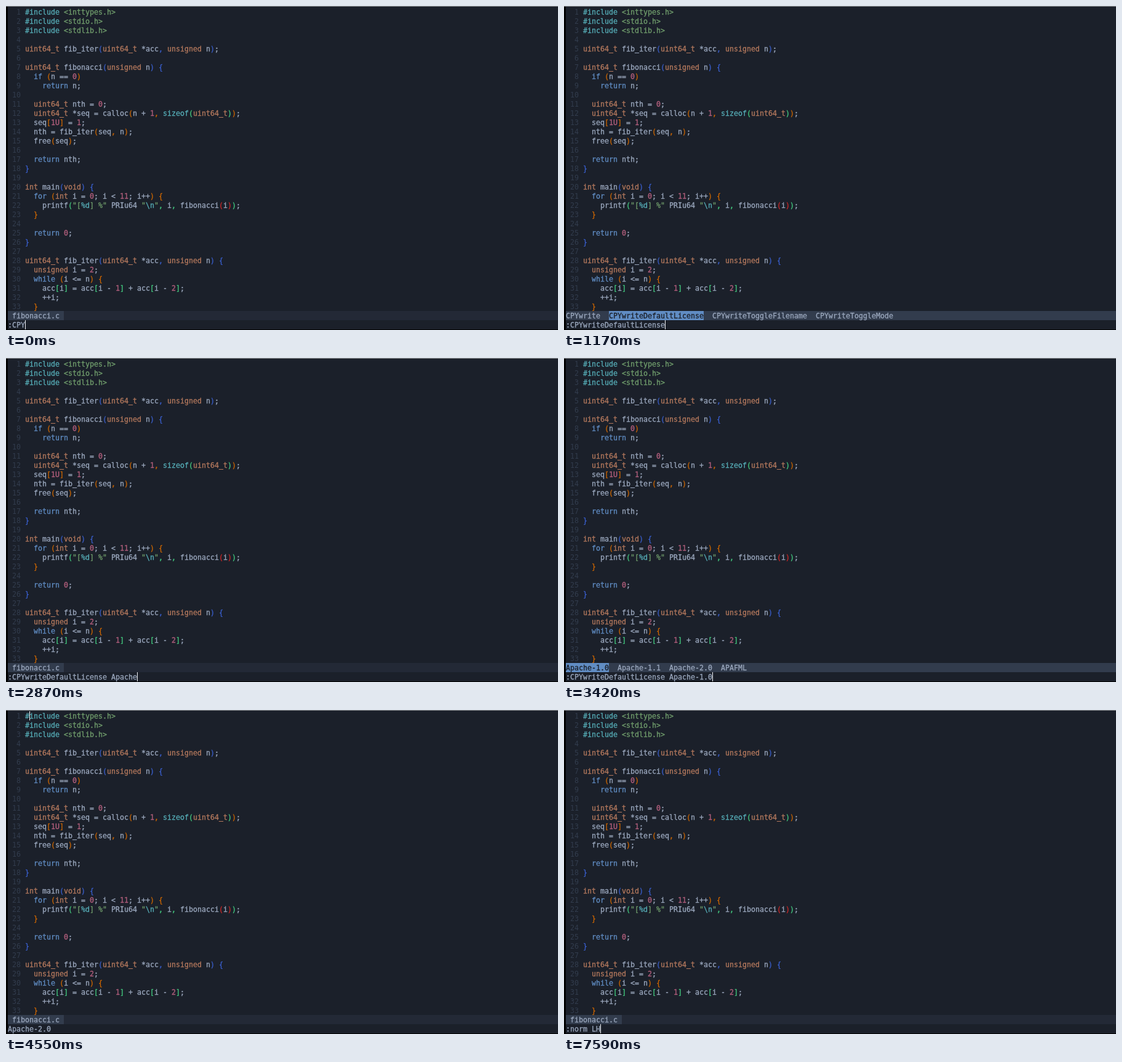
Write an HTML page that moves like this. It is 897 px wide and 528 px high and loops after 8000 ms.

```html
<!DOCTYPE html>
<html lang="en">
<head>
<meta charset="utf-8">
<title>Editor session</title>
<style>
html, body { margin: 0; width: 100%; height: 100%; overflow: hidden; background: #000; }
#stage { position: relative; width: 897px; height: 528px; overflow: hidden; background: #000; }
#edge { position: absolute; left: 0; top: 0; width: 897px; height: 1px; background: #8b8d91; }
#term { position: absolute; left: 3px; top: 1px; width: 894px; height: 526px; background: #1b202a; }
pre { position: absolute; left: 0; margin: 0; width: 894px; color: #9aa7bd;
  font: 11.63px/15px "DejaVu Sans Mono", monospace; font-variant-ligatures: none; white-space: pre;
  -webkit-text-stroke: .3px; }
#code { top: 2px; }
#bar { top: 496px; height: 15px; line-height: 17px; }
#cmd { top: 512px; }
#bar span { display: inline-block; height: 15px; vertical-align: top; }
.file { background: #323c4d; }
.pick { background: #608cc3; color: #1b202a; }
#cursor { position: absolute; width: 1px; height: 15px; background: #f4f6fa; }
.nr { color: #323c4d; -webkit-text-stroke: 0; }
.pre { color: #56adb7; }
.str { color: #709d6c; }
.type { color: #b3785d; }
.key { color: #608cc3; }
.num { color: #b15e7c; }
.d1 { color: #3a5fcd; }
.d2 { color: #cd6600; }
.d3 { color: #43cd80; }
.d4 { color: #cd2626; }
</style>
</head>
<body>
<div id="stage">
  <div id="edge"></div>
  <div id="term">
    <pre id="code"></pre>
    <pre id="bar"></pre>
    <pre id="cmd"></pre>
    <div id="cursor"></div>
  </div>
</div>
<script>
const source = String.raw`#include <inttypes.h>
#include <stdio.h>
#include <stdlib.h>

uint64_t fib_iter(uint64_t *acc, unsigned n);

uint64_t fibonacci(unsigned n) {
  if (n == 0)
    return n;

  uint64_t nth = 0;
  uint64_t *seq = calloc(n + 1, sizeof(uint64_t));
  seq[1U] = 1;
  nth = fib_iter(seq, n);
  free(seq);

  return nth;
}

int main(void) {
  for (int i = 0; i < 11; i++) {
    printf("[%d] %" PRIu64 "\n", i, fibonacci(i));
  }

  return 0;
}

uint64_t fib_iter(uint64_t *acc, unsigned n) {
  unsigned i = 2;
  while (i <= n) {
    acc[i] = acc[i - 1] + acc[i - 2];
    ++i;
  }`;

const $ = id => document.getElementById(id);
const escapeHtml = s => s.replace(/&/g, '&amp;').replace(/</g, '&lt;');
const paint = (cls, s) => `<span class="${cls}">${escapeHtml(s)}</span>`;

const rules = [
  ['pre', /^(#include|sizeof\b)/],
  ['str', /^(<\w+\.h>|"[^"]*")/],
  ['type', /^(uint64_t|unsigned|int|void)\b/],
  ['key', /^(if|return|for|while)\b/],
  ['num', /^\d+U?/],
  ['', /^\w+/]
];

// Brackets and the commas inside them take the colour of their nesting depth.
function highlight(text) {
  let html = '', depth = 0;
  while (text) {
    const rule = rules.find(([, re]) => re.test(text));
    const token = rule ? text.match(rule[1])[0] : text[0];
    if ('([{'.includes(token)) html += paint('d' + ++depth, token);
    else if (')]}'.includes(token)) html += paint('d' + depth--, token);
    else if (token === ',') html += paint('d' + depth, token);
    else if (rule && rule[0] === 'str')
      html += token.split(/(%d|\\n)/).map((s, i) => paint(i % 2 ? 'pre' : 'str', s)).join('');
    else html += rule && rule[0] ? paint(rule[0], token) : escapeHtml(token);
    text = text.slice(token.length);
  }
  return html;
}

$('code').innerHTML = highlight(source).split('\n')
  .map((line, i) => paint('nr', String(i + 1).padStart(3) + ' ') + line).join('\n');

const commands = ['CPYwrite', 'CPYwriteDefaultLicense', 'CPYwriteToggleFilename', 'CPYwriteToggleMode'];
const licenses = ['Apache-1.0', 'Apache-1.1', 'Apache-2.0', 'APAFML'];
const setDefault = ':CPYwriteDefaultLicense ';

// A cursor is [column, row]; by default it follows the command text.
const events = [];
const at = (time, cmd, menu, pick, cursor = [cmd.length, 34]) =>
  events.push({ time, cmd, menu, pick, cursor });

at(0, ':CPY');
at(200, ':CPY', commands, 0);
at(280, ':CPYwrite', commands, 0);
at(1030, ':CPYwrite', commands, 1);
at(1100, ':CPYwriteDefaultLicense', commands, 1);
at(1830, setDefault);
at(2190, setDefault + 'A');
at(2520, setDefault + 'Ap');
at(2580, setDefault + 'Apa');
at(2870, setDefault + 'Apache');
at(3420, setDefault + licenses[0], licenses, 0);
at(3960, setDefault + licenses[0], licenses, 1, [37, 33]);
at(4020, setDefault + licenses[1], licenses, 1);
at(4160, setDefault + licenses[2], licenses, 2);
at(4550, licenses[2], null, 0, [5, 0]);
at(5160, licenses[2], null, 0, null);
at(5320, licenses[2], null, 0, [5, 0]);
at(5800, ':');
[6190, 6290, 6510, 6610, 6920, 7450, 7590].forEach((time, i) =>
  at(time, ':norm LH'.slice(0, i + 2)));

function show({ cmd, menu, pick, cursor }) {
  $('bar').style.background = menu ? '#323c4d' : '#232936';
  $('bar').innerHTML = menu
    ? menu.map((item, i) => i === pick ? paint('pick', item) : item).join('  ')
    : paint('file', ' fibonacci.c ');
  $('cmd').textContent = cmd;
  const style = $('cursor').style;
  style.display = cursor ? 'block' : 'none';
  if (cursor) {
    style.left = cursor[0] * 7 + 'px';
    style.top = 1 + cursor[1] * 15 + 'px';
  }
}

const start = performance.now();
let current;
function tick() {
  const time = (performance.now() - start) % 8000;
  const next = events.filter(e => e.time <= time).pop();
  if (next !== current) show(current = next);
  requestAnimationFrame(tick);
}
tick();
</script>
</body>
</html>
```
